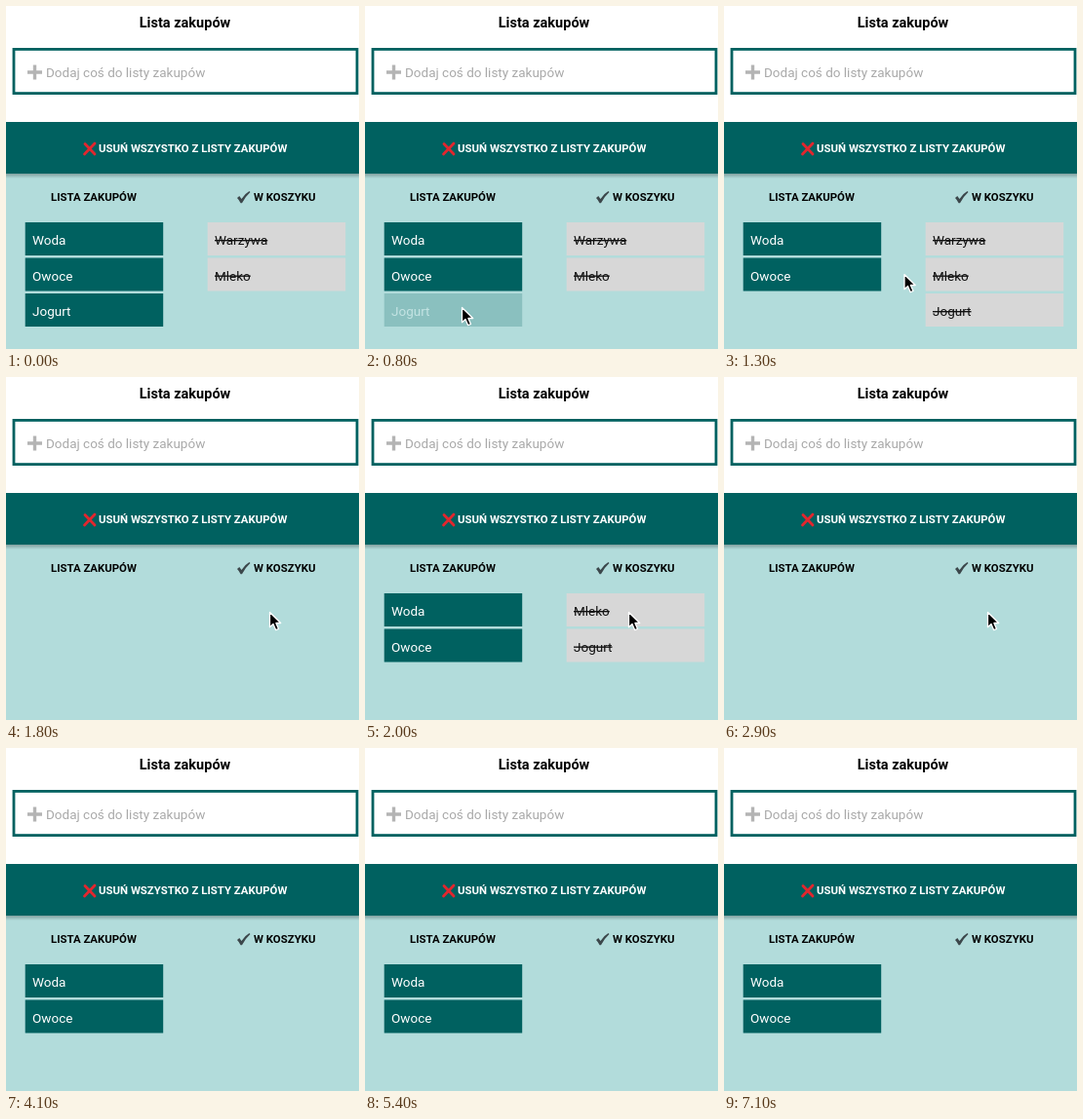
Write an HTML page that moves like this. It is 362 px wide and 352 px high and loops after 7200 ms.

```html
<!DOCTYPE html>
<html lang="pl">
<head>
<meta charset="utf-8">
<title>Lista zakupów</title>
<style>
  html, body { margin: 0; width: 100%; height: 100%; overflow: hidden; background: #fff; }
  svg { display: block; width: 362px; height: 352px; font-family: Roboto, sans-serif; }
  .title { font-size: 14.5px; font-weight: 700; }
  .item { font-size: 13.5px; }
  .caps { font-size: 11.4px; font-weight: 700; }
  .todo rect { fill: #006160; }
  .todo text { fill: #fff; }
  .cart rect { fill: #d7d7d7; }
  .cart text { fill: #111; text-decoration: line-through; }
</style>
</head>
<body>
<svg viewBox="0 0 362 352" xmlns="http://www.w3.org/2000/svg">
  <defs>
    <linearGradient id="shade" x1="0" y1="0" x2="0" y2="1">
      <stop offset="0" stop-opacity=".28"/>
      <stop offset="1" stop-opacity="0"/>
    </linearGradient>
  </defs>
  <rect width="362" height="352" fill="#fff"/>
  <text class="title" x="183.5" y="21.5" text-anchor="middle">Lista zakupów</text>

  <rect x="8" y="44.4" width="352" height="45.2" fill="#fff" stroke="#006160" stroke-width="2.8"/>
  <path d="M22 68H37M29.5 60.5V75.5" stroke="#b4b4b4" stroke-width="3.4"/>
  <text class="item" x="41" y="73" fill="#a9a9a9">Dodaj coś do listy zakupów</text>

  <rect y="172" width="362" height="180" fill="#b2dcdb"/>
  <rect y="172" width="362" height="5" fill="url(#shade)"/>
  <rect y="119" width="362" height="53" fill="#006160"/>
  <path d="M81 141.5L91 152M91 141L80.5 152" stroke="#e3262e" stroke-width="2.8" stroke-linecap="round"/>
  <text class="caps" x="95" y="150" fill="#fff">USUŃ WSZYSTKO Z LISTY ZAKUPÓW</text>

  <text class="caps" x="46" y="200">LISTA ZAKUPÓW</text>
  <path d="M237 197L239.3 195L241.5 198Q245 192.5 249.5 190L250.5 191Q245.5 195.5 242 202.3H240.6Q239 199 237 197Z" fill="#3c474b"/>
  <text class="caps" x="254" y="200">W KOSZYKU</text>

  <g id="todo" class="todo"></g>
  <g id="cart" class="cart"></g>
  <path id="cursor" d="M0 0V15.2L3.5 12L6.2 18.2L9 17L6.4 11H11.2Z" fill="#000" stroke="#fff" stroke-width="1.3" stroke-linejoin="round"/>
</svg>
<script>
const LOOP = 7200, TICK = 100, GHOST = 0.22;
const $ = id => document.getElementById(id);
const base = ['Woda', 'Owoce'];

// start, to-do items, cart items, item being pressed
const states = [
  [0, [...base, 'Jogurt'], ['Warzywa', 'Mleko']],
  [800, [...base, 'Jogurt'], ['Warzywa', 'Mleko'], 'Jogurt'],
  [900, [], []],
  [1000, base, ['Warzywa', 'Mleko', 'Jogurt']],
  [1700, base, ['Warzywa', 'Mleko', 'Jogurt'], 'Warzywa'],
  [1800, [], []],
  [2000, base, ['Mleko', 'Jogurt']],
  [2300, base, ['Mleko', 'Jogurt'], 'Mleko'],
  [2400, base, ['Jogurt']],
  [2700, base, ['Jogurt'], 'Jogurt'],
  [2800, [], []],
  [3000, base, []]
];

// time, x, y of the pointer tip
const track = [
  [100, 128, 347], [600, 99.5, 309.5], [1000, 99.5, 309.5],
  [1600, 270.5, 241.5], [3400, 270.5, 241.5]
];

const ease = p => p * p * (3 - 2 * p);

function rows(names, x, pressed) {
  return names.map((name, i) => {
    const y = 222 + i * 36.5;
    return `<g opacity="${name === pressed ? GHOST : 1}">
      <rect x="${x}" y="${y}" width="141.5" height="34"/>
      <text class="item" x="${x + 7.3}" y="${y + 23}">${name}</text></g>`;
  }).join('');
}

function moveCursor(t) {
  const i = track.findIndex(([end]) => t < end);
  const visible = i > 0;
  $('cursor').style.display = visible ? '' : 'none';
  if (!visible) return;
  const [t0, x0, y0] = track[i - 1], [t1, x1, y1] = track[i];
  const p = ease((t - t0) / (t1 - t0));
  $('cursor').setAttribute('transform', `translate(${x0 + (x1 - x0) * p} ${y0 + (y1 - y0) * p})`);
}

let shown;
function draw(t) {
  const state = states.findLast(([start]) => start <= t);
  if (state !== shown) {
    const [, todo, cart, pressed] = shown = state;
    $('todo').innerHTML = rows(todo, 19.7, pressed);
    $('cart').innerHTML = rows(cart, 206.7, pressed);
  }
  moveCursor(t);
}

const begin = performance.now();
function frame() {
  const t = (performance.now() - begin) % LOOP;
  draw(Math.floor(t / TICK) * TICK);
  requestAnimationFrame(frame);
}
frame();
</script>
</body>
</html>
```
